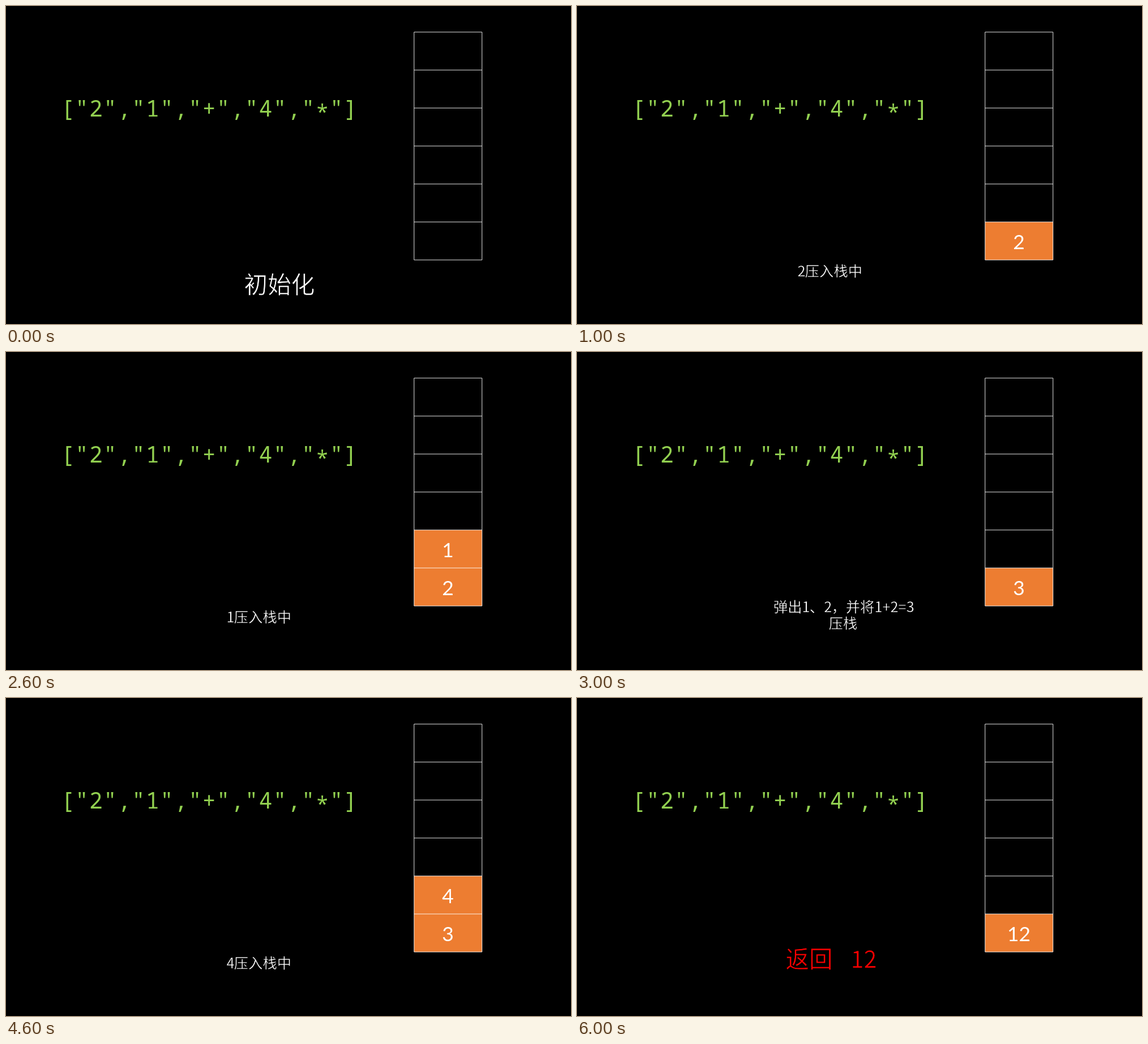
Animation of 998x561 px, one loop 7000 ms. Source, as an HTML page:

```html
<!DOCTYPE html>
<html lang="zh-CN">
<head>
<meta charset="utf-8">
<title>Stack evaluation</title>
<style>
html, body { margin: 0; width: 100%; height: 100%; overflow: hidden; background: #000; }
svg { display: block; width: 998px; height: 561px; }
text { white-space: pre; }
.tokens { font: 39.6px "Noto Sans Mono", monospace; letter-spacing: 1.24px; fill: #92d050; }
/* the dark outline thins the strokes of the regular weight */
.caption { font: 300 25.3px "Noto Sans CJK SC", "Noto Sans CJK", sans-serif; fill: #fff; stroke: #000; stroke-width: .4; }
.tight { letter-spacing: -.8px; }
.big { font-size: 41.6px; stroke-width: .7; }
.result { fill: #f00; }
.cell rect { x: 721px; width: 120px; height: 67px; fill: #ed7d31; }
.cell text { font: 35.5px Lato, sans-serif; fill: #fff; text-anchor: middle; }
.grid { fill: none; stroke: #fff; stroke-opacity: .9; }
.step { opacity: 0; animation: show 7s step-end infinite; animation-delay: calc(var(--i) * 1s - 7s); }
@keyframes show {
  0% { opacity: 1; }
  14.285714%, 100% { opacity: 0; }
}
</style>
</head>
<body>
<svg viewBox="0 0 998 561">
  <text class="tokens" x="97" y="195">["2","1","+","4","<tspan dy="7">*</tspan><tspan dy="-7">"]</tspan></text>

  <g class="step" style="--i:0">
    <text class="caption big" x="420.6" y="506.5">初始化</text>
  </g>

  <g class="step" style="--i:1">
    <g class="cell"><rect y="381"/><text x="780.5" y="428.5">2</text></g>
    <text class="caption" y="477"><tspan x="389.5">2</tspan><tspan x="402.8">压入栈中</tspan></text>
  </g>

  <g class="step" style="--i:2">
    <g class="cell"><rect y="314"/><text x="780.5" y="361.5">1</text></g>
    <g class="cell"><rect y="381"/><text x="780.5" y="428.5">2</text></g>
    <text class="caption" y="477"><tspan x="389.5">1</tspan><tspan x="402.8">压入栈中</tspan></text>
  </g>

  <g class="step" style="--i:3">
    <g class="cell"><rect y="381"/><text x="780.5" y="428.5">3</text></g>
    <text class="caption" y="458.5"><tspan x="347">弹出</tspan><tspan class="tight">1</tspan>、<tspan class="tight">2</tspan>，并将<tspan x="525.5">1+2=3</tspan><tspan x="444.7" y="488">压栈</tspan></text>
  </g>

  <g class="step" style="--i:4">
    <g class="cell"><rect y="314"/><text x="780.5" y="361.5">4</text></g>
    <g class="cell"><rect y="381"/><text x="780.5" y="428.5">3</text></g>
    <text class="caption" y="477"><tspan x="389.5">4</tspan><tspan x="402.8">压入栈中</tspan></text>
  </g>

  <g class="step" style="--i:5">
    <g class="cell"><rect y="381"/><text x="780.5" y="428.5">12</text></g>
    <text class="caption" y="458.5"><tspan x="343">弹出</tspan><tspan class="tight">4</tspan>、<tspan class="tight">3</tspan>，并将<tspan class="tight" x="521.3">3<tspan dy="5">*</tspan><tspan dy="-5">4=12</tspan></tspan><tspan x="444.7" y="488">压栈</tspan></text>
  </g>

  <g class="step" style="--i:6">
    <g class="cell"><rect y="381"/><text x="780.5" y="428.5">12</text></g>
    <text class="caption big result" y="476"><tspan x="368.4">返回</tspan><tspan x="483.5">12</tspan></text>
  </g>

  <path class="grid" d="M720.8 46H840.8V448H720.8ZM720.8 113h120m-120 67h120m-120 67h120m-120 67h120m-120 67h120"/>
</svg>
</body>
</html>
```
